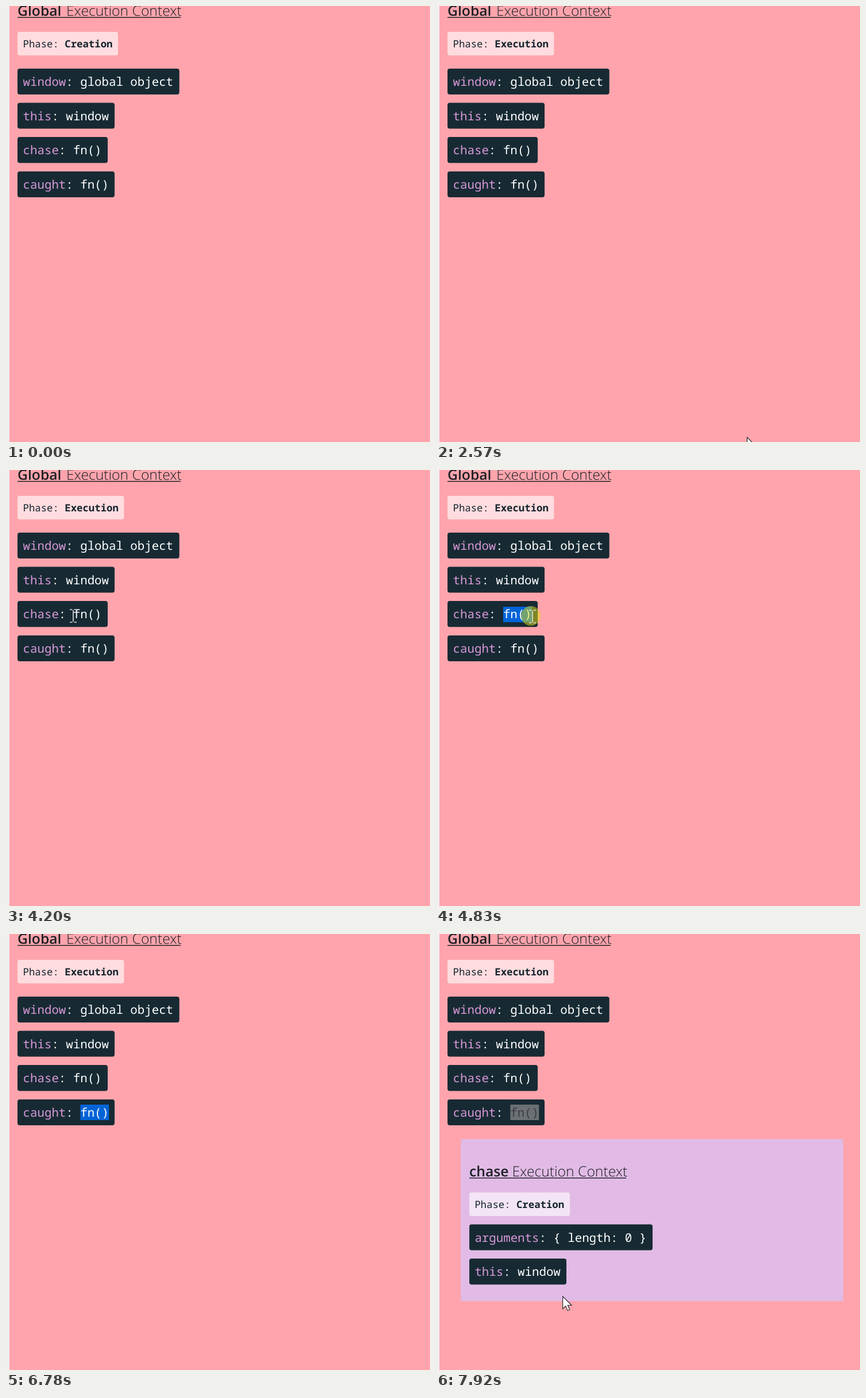
Recreate the animation shown at these times as an HTML page. Size 738x759 px, loop 8000 ms.

```html
<!DOCTYPE html>
<html lang="en">
<head>
<meta charset="utf-8">
<title>Execution Context</title>
<style>
  html, body { margin: 0; width: 100%; height: 100%; overflow: hidden; background: #ffa4ac; }
  svg { display: block; width: 100vw; height: 100vh; text-rendering: geometricPrecision; }

  .title { font: 300 24.7px "Open Sans", "Noto Sans", sans-serif; fill: #1c2025; }
  .title .name { font-weight: 600; }
  .rule { fill: #22262b; }
  .phase rect { fill: #fff; fill-opacity: .62; }
  .phase text { font: 17.33px "Noto Sans Mono", monospace; fill: #14232c; }
  .phase .value { font-weight: 700; }
  .chip rect { fill: #172a33; }
  .chip text { font: 20.75px "Noto Sans Mono", monospace; fill: #fff; }
  .chip .key { fill: #d898d8; }
  .chip .mark { fill: #0064d8; }
  .beam path { fill: none; stroke: #e4e4e4; stroke-width: 1.6; }

  /* Percentages are milliseconds / 80 */
  .play { animation: 8s step-end -5ms infinite; }
  .creation { animation-name: creation; }
  .execution { animation-name: execution; }
  .chase-mark { animation-name: chase-mark; }
  .caught-mark { animation-name: caught-mark; }
  .caught-value { animation-name: caught-value; }
  .panel { animation-name: panel; }
  .pointer { animation-name: pointer; }
  .arrow { animation-name: arrow; }
  .beam { animation-name: beam; }
  .press { animation-name: press; }

  @keyframes creation { 0% { opacity: 1 } 6.25%, 100% { opacity: 0 } }
  @keyframes execution { 0% { opacity: 0 } 6.25%, 100% { opacity: 1 } }
  @keyframes panel { 0% { opacity: 0 } 97.375%, 100% { opacity: 1 } }

  @keyframes chase-mark {
    0%     { width: 0; }
    56.5%  { width: 12.45px; }
    57.5%  { width: 24.9px; }
    58.5%  { width: 37.35px; }
    59.375% { width: 49.8px; }
    75%, 100% { width: 0; }
  }
  @keyframes caught-mark {
    0%      { width: 0; fill: #0064d8; }
    77.875% { width: 24.9px; fill: #0064d8; }
    78.875% { width: 37.35px; fill: #0064d8; }
    80%     { width: 49.8px; fill: #0064d8; }
    96.375%, 100% { width: 49.8px; fill: #6b7074; }
  }
  @keyframes caught-value { 0% { fill: #fff } 96.375%, 100% { fill: #3a3c43 } }

  @keyframes pointer {
    0%      { transform: translate(541px, 750px); }
    33.125% { transform: translate(462px, 656px); }
    34.125% { transform: translate(392px, 572px); }
    41.875% { transform: translate(356px, 529px); animation-timing-function: steps(4); }
    45.625% { transform: translate(180px, 319px); animation-timing-function: steps(4); }
    49.5%   { transform: translate(121px, 252px); }
    51.625% { transform: translate(119px, 253px); }
    52.5%   { transform: translate(117px, 254px); }
    55.625% { transform: translate(119px, 254px); animation-timing-function: steps(5); }
    60.375% { transform: translate(168px, 255px); }
    64.375% { transform: translate(160px, 262px); animation-timing-function: steps(4); }
    68.25%  { transform: translate(11px, 326px); animation-timing-function: steps(5); }
    73.125% { transform: translate(133px, 312px); }
    77.875% { transform: translate(150px, 316px); }
    78.875% { transform: translate(166px, 322px); }
    80%     { transform: translate(182px, 326px); }
    99%, 100% { transform: translate(220px, 630px); }
  }
  @keyframes arrow {
    0%, 46.625%, 73.125%, 84.75% { opacity: 0; }
    32.125%, 66.25%, 99%, 100% { opacity: 1; }
    71.25% { opacity: 0; }
  }
  @keyframes beam {
    0%, 66.25%, 84.75%, 100% { opacity: 0; }
    46.625%, 71.25% { opacity: 1; }
  }
  @keyframes press {
    0%, 62.25%, 83.75%, 100% { opacity: 0; }
    54.625%, 75% { opacity: 1; }
  }
</style>
</head>
<body>
<svg viewBox="0 0 738 759">
  <rect width="738" height="759" fill="#ffa4ac"/>
  <rect width="6" height="759" fill="#f0eff0"/>

  <g class="title">
    <text class="name" x="20" y="16.5">Global</text>
    <text x="105" y="16.5">Execution Context</text>
    <rect class="rule" x="20" y="19" width="284" height="1.5"/>
  </g>

  <g class="phase play creation">
    <rect x="20" y="45" width="175" height="41" rx="4"/>
    <text x="29.5" y="72">Phase: <tspan class="value">Creation</tspan></text>
  </g>
  <g class="phase play execution">
    <rect x="20" y="45" width="185.4" height="41" rx="4"/>
    <text x="29.5" y="72">Phase: <tspan class="value">Execution</tspan></text>
  </g>

  <g class="chip">
    <rect x="20" y="109" width="281.7" height="45" rx="4"/>
    <text x="29.6" y="139"><tspan class="key">window</tspan>: global object</text>
  </g>
  <g class="chip">
    <rect x="20" y="168.5" width="169" height="45" rx="4"/>
    <text x="29.6" y="198.6"><tspan class="key">this</tspan>: window</text>
  </g>
  <g class="chip">
    <rect x="20" y="228" width="157" height="45.3" rx="4"/>
    <rect class="mark play chase-mark" x="116.9" y="238" height="27"/>
    <text x="29.6" y="258.3"><tspan class="key">chase</tspan>: fn()</text>
  </g>
  <g class="chip">
    <rect x="20" y="288" width="169" height="45" rx="4"/>
    <rect class="mark play caught-mark" x="129.4" y="297" height="27"/>
    <text x="29.6" y="318"><tspan class="key">caught</tspan>: <tspan class="play caught-value">fn()</tspan></text>
  </g>

  <g class="play panel">
    <rect x="43" y="357" width="666" height="282" rx="4" fill="#e1bbe6"/>
    <g class="title">
      <text class="name" x="58" y="421.5">chase</text>
      <text x="132.5" y="421.5">Execution Context</text>
      <rect class="rule" x="58" y="424" width="273" height="1.5"/>
    </g>
    <g class="phase">
      <rect x="58" y="450" width="175" height="41" rx="4"/>
      <text x="67.2" y="477">Phase: <tspan class="value">Creation</tspan></text>
    </g>
    <g class="chip">
      <rect x="58" y="505.5" width="319" height="45" rx="4"/>
      <text x="67.4" y="535.6"><tspan class="key">arguments</tspan>: { length: 0 }</text>
    </g>
    <g class="chip">
      <rect x="58" y="565" width="169" height="45.3" rx="4"/>
      <text x="67.4" y="595.2"><tspan class="key">this</tspan>: window</text>
    </g>
  </g>

  <g class="play pointer">
    <circle class="play press" cx="-3" cy="-1" r="17" fill="#dcdc14" fill-opacity=".52"/>
    <g class="play beam">
      <path d="M-6-11H-1.5M1.5-11H6M0-10V10M-6 11H-1.5M1.5 11H6"/>
    </g>
    <path class="play arrow" d="M.6.8V22.4L5.6 17.7 9 25.4 12.6 23.9 9.3 16.3H16Z" fill="#fff" stroke="#1a1a1a" stroke-width="1.1"/>
  </g>
</svg>
</body>
</html>
```
